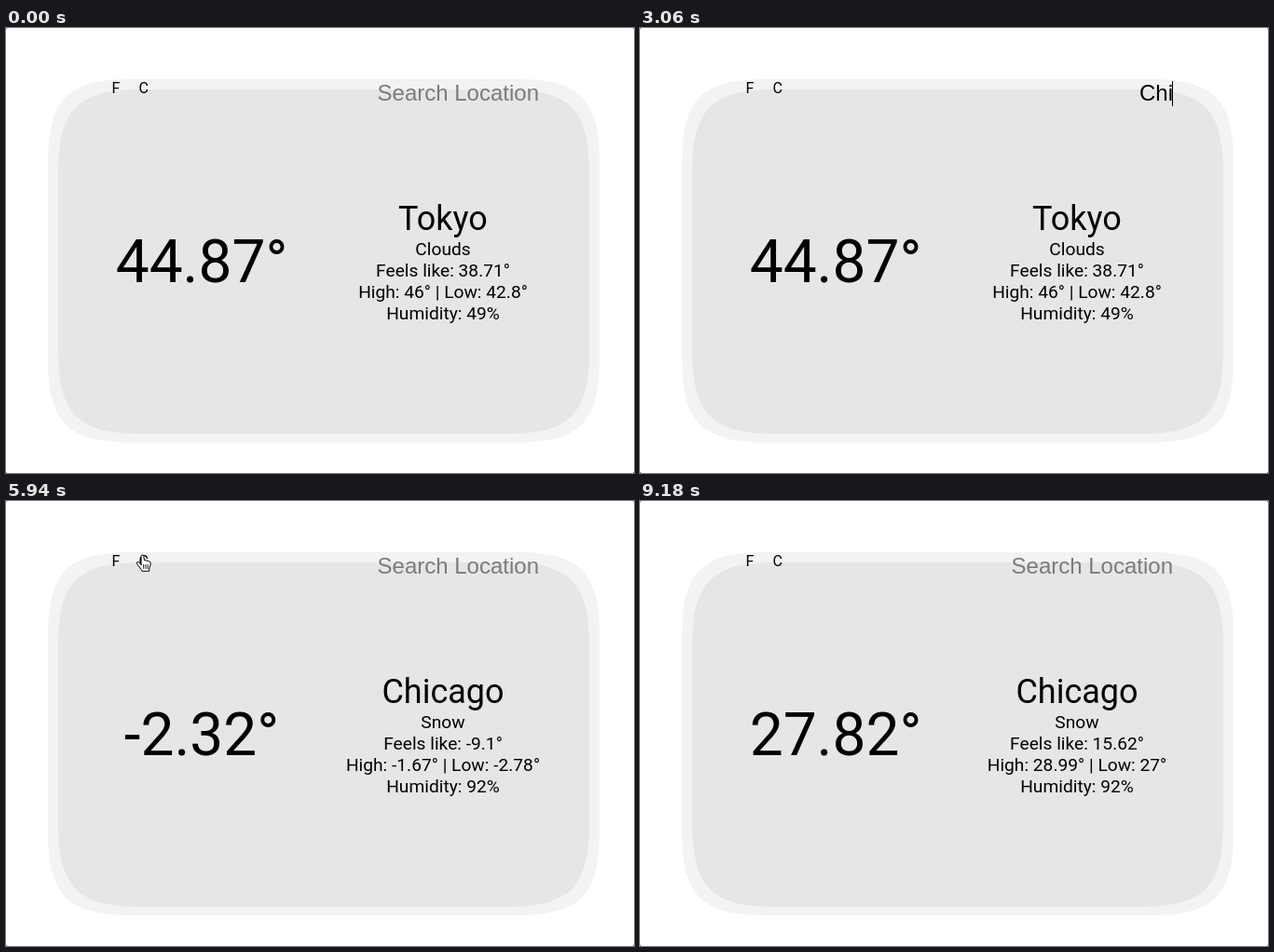
Write an HTML page that moves like this. It is 674x478 px and loops after 9.21 s.

```html
<!DOCTYPE html>
<html lang="en">
<head>
<meta charset="utf-8">
<title>Weather card</title>
<style>
  html, body { margin: 0; width: 100%; height: 100%; overflow: hidden; background: #fff; }
  svg { display: block; width: 674px; height: 478px; }
  text { font-family: Roboto, sans-serif; fill: #000; }
  .mid { text-anchor: middle; }
  .unit { font-size: 16px; }
  #temp { font-size: 64px; }
  #city { font-size: 36px; }
  .row { font-size: 19.2px; }
  #search { font-family: "Liberation Sans", Arial, sans-serif; font-size: 24px; text-anchor: end; }
  #cursor path { stroke-linejoin: round; stroke-linecap: round; }
</style>
</head>
<body>
<svg viewBox="0 0 674 478">
  <path fill="#f3f3f3" d="M45 145c0-69 21-90 90-90h412c69 0 90 21 90 90v210c0 69-21 90-90 90h-412c-69 0-90-21-90-90z"/>
  <path fill="#e6e6e6" d="M56 156c0-69 21-90 90-90h390c69 0 90 21 90 90v190c0 69-21 90-90 90h-390c-69 0-90-21-90-90z"/>
  <path fill="#777" d="M0 0h1v1h-1zM673 0h1v1h-1zM0 477h1v1h-1zM673 477h1v1h-1z"/>
  <circle id="ripple" cy="65" r="0"/>
  <text class="unit mid" x="117.8" y="70">F</text>
  <text class="unit mid" x="147.8" y="70">C</text>
  <text id="search" x="572" y="78"></text>
  <rect id="caret" x="571" y="57" width="1" height="27"/>
  <text id="temp" class="mid" x="210" y="273"></text>
  <text id="city" class="mid" x="469" y="217"></text>
  <text id="sky" class="row mid" x="469" y="244"></text>
  <text id="feels" class="row mid" x="469" y="267"></text>
  <text id="range" class="row mid" x="469" y="290"></text>
  <text id="humid" class="row mid" x="469" y="313"></text>
  <g id="cursor">
    <path id="arrow" stroke="#fff" d="M0 0v13.5l3.1-2.9 2.3 5.2 2.2-1-2.3-5h4.2z"/>
    <g id="beam" fill="none">
      <path stroke="#fff" stroke-width="2.4" d="M-2.5-7q2.5 0 2.5 2v10q0 2-2.5 2M2.5-7q-2.5 0-2.5 2v10q0 2 2.5 2"/>
      <path stroke="#000" d="M-2.5-7q2.5 0 2.5 2v10q0 2-2.5 2M2.5-7q-2.5 0-2.5 2v10q0 2 2.5 2M-1.5 2h3"/>
    </g>
    <g id="hand">
      <path fill="#fff" stroke="#000" d="M-2 8V1.5q0-1.6 1.3-1.6t1.5 1.6l.7 4.2q1.7-.9 2.4.6 1.7-.8 2.3.7 1.9-.4 2 1.6 0 3-1.2 5.2L6.5 17.300h-7.500q-1-2.300-2.800-4.300-1.600-1.800-2.700-3.900-.4-1.800 1.300-1.700 1.300.3 3.200 3z"/>
      <path fill="none" stroke="#000" stroke-width=".9" d="M.7 10.500v4M3 10.500v4M5.200 10.500v4"/>
    </g>
  </g>
</svg>
<script>
const LOOP = 9210;
const $ = id => document.getElementById(id);

const reports = {
  tokyo: ["44.87°", "Tokyo", "Clouds", "38.71°", "46°", "42.8°", "49%"],
  chicagoF: ["27.82°", "Chicago", "Snow", "15.62°", "28.99°", "27°", "92%"],
  chicagoC: ["-2.32°", "Chicago", "Snow", "-9.1°", "-1.67°", "-2.78°", "92%"]
};
const reportAt = [[0, "tokyo"], [3930, "chicagoF"], [5430, "chicagoC"], [7410, "chicagoF"]];

const query = "Chicago";
const keyTimes = [2580, 2790, 3000, 3240, 3420, 3570, 3720];
const caretOn = [[1170, 1680], [2130, 4410], [4920, 5370]];
const clicks = [[5370, 147.8], [7350, 117.8]];

// Each move: start, end, points of a quadratic curve
const moves = [
  [30, 930, 121, 415, 360, 190, 490, 59],
  [960, 1410, 490, 59, 500, 64, 502, 74],
  [4380, 5130, 502, 74, 300, 4, 147, 58],
  [5910, 6510, 147, 58, 132, 60, 117, 59],
  [7800, 8100, 117, 59, 117, 90, 120, 141],
  [8100, 8700, 120, 141, 150, 330, 498, 480]
];
const shapeAt = [
  [0, "none"], [30, "arrow"], [870, "beam"], [2580, "none"], [4380, "beam"],
  [4590, "arrow"], [5070, "hand"], [6090, "arrow"], [6300, "hand"],
  [7920, "arrow"], [8700, "none"]
];

const latest = (list, t) => list.filter(e => e[0] <= t).pop();
const put = (id, text) => { if ($(id).textContent !== text) $(id).textContent = text; };
const show = (id, on) => $(id).setAttribute("visibility", on ? "visible" : "hidden");

function cursorPos(t) {
  const [start, end, x0, y0, x1, y1, x2, y2] = latest(moves, t) || moves[0];
  const p = Math.min(1, Math.max(0, (t - start) / (end - start)));
  // The last two moves join into one accelerating exit
  const u = start >= 7800 ? p ** 1.3 : p * p * (3 - 2 * p);
  const mix = (a, b, c) => (1 - u) ** 2 * a + 2 * u * (1 - u) * b + u * u * c;
  return [mix(x0, x1, x2), mix(y0, y1, y2)].map(Math.round);
}

function drawReport(t) {
  const [temp, city, sky, feels, high, low, humid] = reports[latest(reportAt, t)[1]];
  put("temp", temp);
  put("city", city);
  put("sky", sky);
  put("feels", `Feels like: ${feels}`);
  put("range", `High: ${high} | Low: ${low}`);
  put("humid", `Humidity: ${humid}`);
}

function drawSearch(t) {
  const count = t < 3930 ? keyTimes.filter(k => k <= t).length : 0;
  put("search", query.slice(0, count) || "Search Location");
  $("search").style.fill = count ? "#000" : "#7b7b7b";
  show("caret", caretOn.some(([a, b]) => t >= a && t < b));
}

function drawRipple(t) {
  const click = latest(clicks, t);
  const p = click ? (t - click[0]) / 240 : 1;
  show("ripple", p < 1);
  if (p >= 1) return;
  $("ripple").setAttribute("cx", click[1]);
  $("ripple").setAttribute("r", 36 * p);
  $("ripple").setAttribute("fill-opacity", 0.07 * (1 - p));
}

function drawCursor(t) {
  const shape = latest(shapeAt, t)[1];
  for (const id of ["arrow", "beam", "hand"]) show(id, id === shape);
  $("cursor").setAttribute("transform", `translate(${cursorPos(t)})`);
}

function frame(now) {
  const t = Math.floor((now % LOOP) / 30) * 30;
  drawReport(t);
  drawSearch(t);
  drawRipple(t);
  drawCursor(t);
  requestAnimationFrame(frame);
}
frame(0);
</script>
</body>
</html>
```
